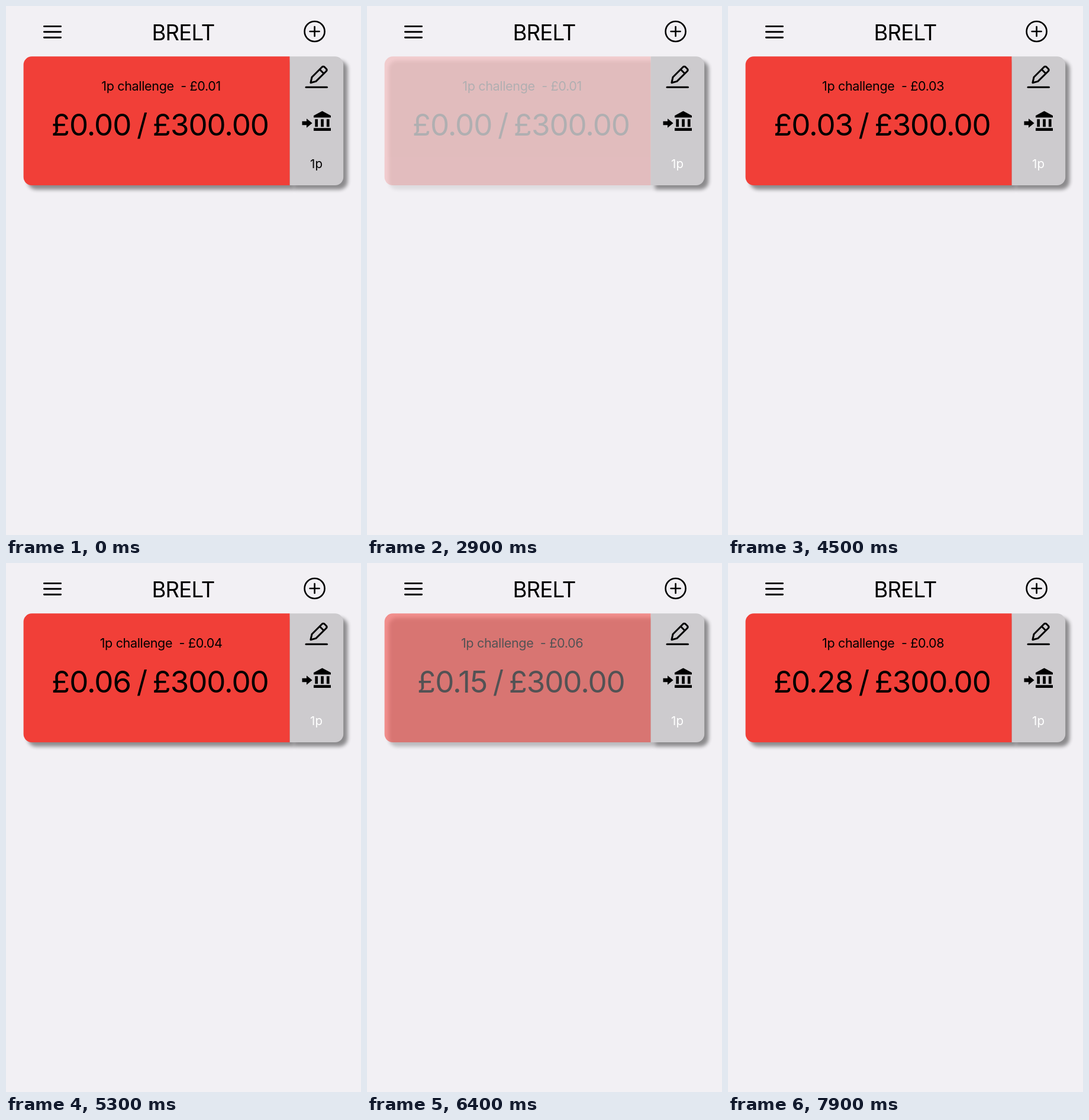
These frames come from a looping animation (600 by 894 pixels, 8000 ms). An HTML page:

```html
<!DOCTYPE html>
<html lang="en">
<head>
<meta charset="utf-8">
<title>Savings card</title>
<style>
  html, body { margin: 0; width: 100%; height: 100%; overflow: hidden; background: #f2f0f4; }
  svg { display: block; width: 100%; height: 100%; }
  text {
    font-family: Inter, Roboto, "Liberation Sans", sans-serif;
    font-optical-sizing: none;
    text-anchor: middle;
    white-space: pre;
  }
  #total { letter-spacing: -1.05px; word-spacing: -3.7px; }
  .line { fill: none; stroke: #000; stroke-linecap: round; stroke-linejoin: round; }
</style>
</head>
<body>
<svg viewBox="0 0 600 894">
  <defs>
    <filter id="blur" x="-20%" y="-20%" width="140%" height="140%">
      <feGaussianBlur stdDeviation="3.4"/>
    </filter>
    <path id="left" d="M479.7 85.3H43.6a14 14 0 0 0-14 14V289a14 14 0 0 0 14 14H479.7Z"/>
    <path id="right" d="M479.7 85.3H556.2a14 14 0 0 1 14 14V289a14 14 0 0 1-14 14H479.7Z"/>
  </defs>
  <rect width="600" height="894" fill="#f2f0f4"/>

  <!-- header -->
  <path class="line" stroke-width="2.9" d="M64.4 34.4H92.6M64.4 43.8H92.6M64.4 53.2H92.6"/>
  <text x="299.5" y="57.6" font-size="36.5" letter-spacing="-0.8">BRELT</text>
  <g class="line" stroke-width="2.6">
    <circle cx="521.6" cy="43" r="17"/>
    <path d="M513.6 43H529.6M521.6 35V51"/>
  </g>

  <!-- savings card -->
  <g id="shade"><use href="#left" x="7.2" y="7.2" opacity="0.42" filter="url(#blur)"/></g>
  <g id="card">
    <use href="#left" fill="#f13f38"/>
    <text id="label" x="262.1" y="143" font-size="21.6" letter-spacing="-0.37"></text>
    <text id="total" x="260.4" y="218.8" font-size="51"></text>
  </g>

  <!-- side panel -->
  <use href="#right" x="7.2" y="7.2" opacity="0.42" filter="url(#blur)"/>
  <use href="#right" fill="#cdcbce"/>
  <g class="line" stroke-width="3">
    <path d="M507 137.3H542.5"/>
    <path d="M514.9 129.7L517 120.3L534 103.2Q536.2 101.2 538.4 103.2L541.2 106Q543.2 108 541.2 110.2L523.8 127.4ZM530.2 107.2L537.2 114.2"/>
  </g>
  <path d="M534.5 177.5L549 185.2V188.6H520V185.2ZM522.3 191.3h4.7v13h-4.7ZM532.2 191.3h4.7v13h-4.7ZM541.9 191.3h4.7v13h-4.7ZM520 206.3h29v4.8h-29Z"/>
  <path d="M500.5 194.8H508V190.3L517.6 198L508 205.8V201.3H500.5Z"/>
  <text id="mode" x="524.5" y="274.2" font-size="20.5"></text>
</svg>
<script>
  const LOOP = 8000, DIM = 0.2, FADE = 250;
  const toggle = [1090, 1200];
  // press and release times of each deposit
  const taps = [[2880, 3030], [3930, 4060], [4870, 5000], [5520, 5650],
                [6150, 6284], [6780, 6920], [7370, 7500]];
  const $ = id => document.getElementById(id);
  const shade = $("shade"), card = $("card"), label = $("label"), total = $("total"), mode = $("mode");
  const pounds = pence => "£" + (pence / 100).toFixed(2);
  const easeInOut = p => p < 0.5 ? 2 * p * p : 1 - 2 * (1 - p) * (1 - p);

  // Dims at once on press, then fades back after release.
  function touch(t, [down, up]) {
    if (t < down) return 1;
    if (t < up) return DIM;
    return DIM + (1 - DIM) * easeInOut(Math.min(1, (t - up) / FADE));
  }

  function draw(t) {
    const done = taps.filter(([, up]) => t >= up).length;
    const alpha = Math.min(...taps.map(tap => touch(t, tap)));
    shade.setAttribute("opacity", alpha);
    card.setAttribute("opacity", alpha);
    label.textContent = "1p challenge\u00a0\u00a0- " + pounds(done + 1);
    total.textContent = pounds(done * (done + 1) / 2) + " / £300.00";
    mode.textContent = "1p";
    mode.setAttribute("fill", t >= toggle[1] ? "#fff" : "#000");
    mode.setAttribute("opacity", touch(t, toggle));
  }

  const start = performance.now();
  function tick() {
    draw((performance.now() - start) % LOOP);
    requestAnimationFrame(tick);
  }
  draw(0);
  requestAnimationFrame(tick);
</script>
</body>
</html>
```
